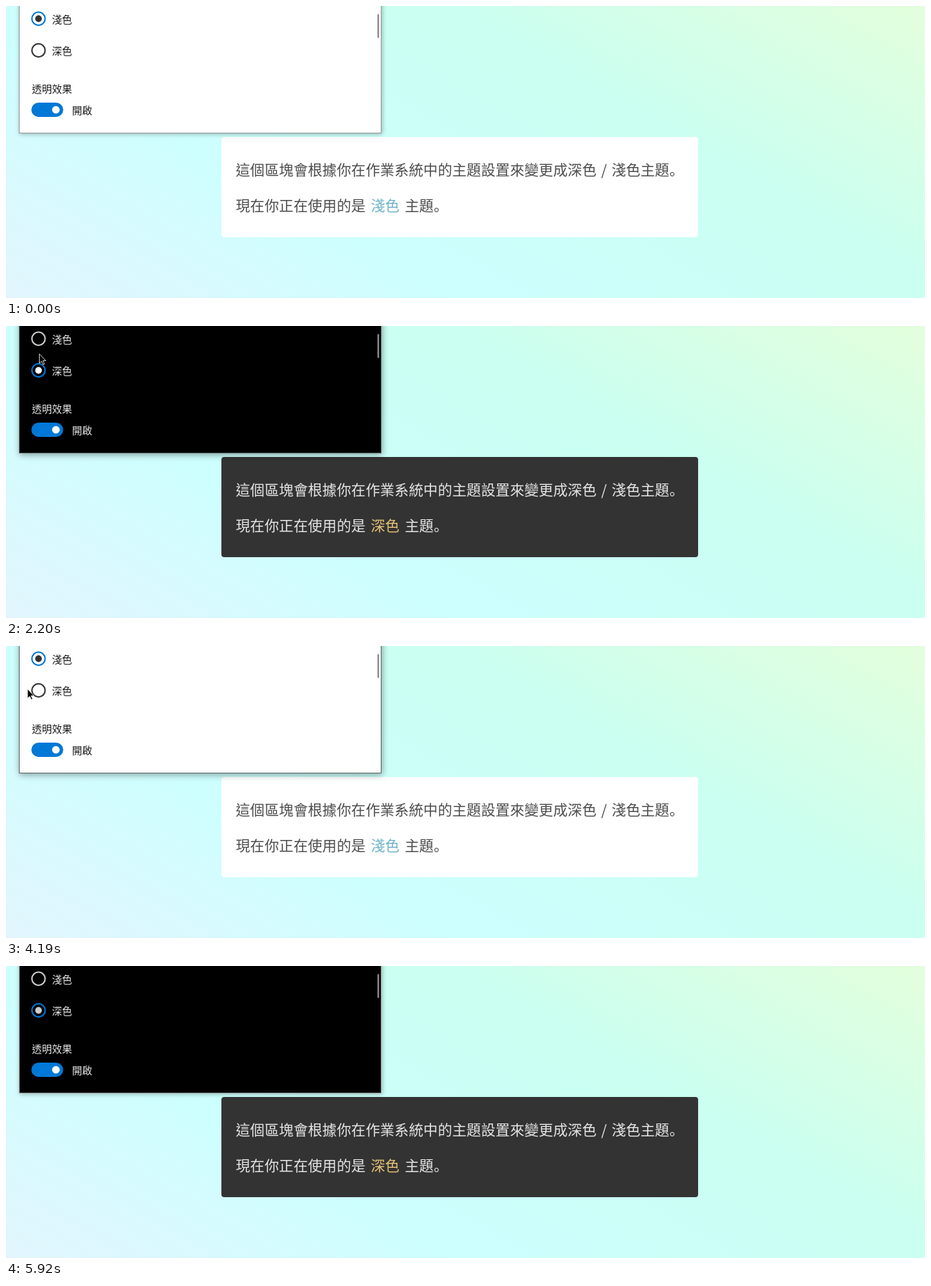
These frames come from a looping animation (1280x408 px, 6020 ms). An HTML page:

```html
<!DOCTYPE html>
<html lang="zh-Hant">
<head>
<meta charset="utf-8">
<style>
  html, body { margin: 0; width: 100%; height: 100%; overflow: hidden; }
  body { background: linear-gradient(30deg, #e2f5fd, #ccfffe 33%, #cafff1 66%, #e3ffdc); }
  svg { position: absolute; left: 0; top: 0; }
  text { font-family: "Noto Sans CJK TC", "Noto Sans CJK", sans-serif; }

  #card { --ink: #333; --accent: #5aa7c0; fill: #fff; }
  #card.dark { --ink: #fff; --accent: #ffd780; fill: #333; }
  #card text { fill: var(--ink); fill-opacity: .88; font-size: 20px; font-weight: 300; letter-spacing: .1px; }
  #card #theme { fill: var(--accent); }
  /* sets the full stop low and left */
  .stop { font-family: "Noto Sans CJK JP", sans-serif; }

  #ui { --face: #fff; --ink: #000; --ring: #333; --hover: #000; --press: #707070; --bar: #7a7a7a; }
  #ui.dark { --face: #000; --ink: #fff; --ring: #ccc; --hover: #fff; --press: #909090; --bar: #a0a0a0; }
  #ui text { fill: var(--ink); fill-opacity: .9; font-size: 14px; }
  #panel { fill: var(--face); stroke: #999; filter: drop-shadow(1px 1px 3px rgba(0,0,0,.3)); }
  .active #panel { stroke: #5d6868; filter: drop-shadow(1px 2px 5px rgba(0,0,0,.38)); }

  .ring { fill: none; stroke: var(--ring); stroke-width: 2; }
  .dot { fill: var(--ring); visibility: hidden; }
  .hover .ring { stroke: var(--hover); }
  .hover .dot { fill: var(--hover); }
  .press .ring { stroke: var(--press); }
  .on .ring { stroke: #0078d7; }
  .on .dot { visibility: visible; }
</style>
</head>
<body>
<svg width="1280" height="408" viewBox="0 0 1280 408">
  <g id="card">
    <rect x="300" y="183" width="664" height="140" rx="4"/>
    <text x="320" y="237">這個區塊會根據你在作業系統中的主題設置來變更成深色</text>
    <text x="829" y="237">/</text>
    <text x="843.5" y="237">淺色主題<tspan class="stop" lang="ja">。</tspan></text>
    <text x="320" y="287">現在你正在使用的是</text>
    <text x="508" y="287" id="theme"></text>
    <text x="555.5" y="287">主題<tspan class="stop" lang="ja">。</tspan></text>
  </g>
  <g id="ui">
    <rect id="panel" x="18.5" y="-19.5" width="504" height="197"/>
    <g id="light" transform="translate(45.3 17.7)">
      <circle class="ring" r="9.2"/>
      <circle class="dot" r="4.7"/>
    </g>
    <g id="deep" transform="translate(45.3 62)">
      <circle class="ring" r="9.2"/>
      <circle class="dot" r="4.7"/>
    </g>
    <text x="64" y="23.5">淺色</text>
    <text x="64" y="67.5">深色</text>
    <text x="36" y="120.5">透明效果</text>
    <text x="92" y="150.5">開啟</text>
    <rect x="35.3" y="135" width="44.4" height="20" rx="10" fill="#0078d7"/>
    <circle cx="69.5" cy="145" r="5.3" fill="#fff"/>
    <rect x="517.5" y="11.5" width="2" height="33" fill="var(--bar)"/>
  </g>
  <path id="cursor" d="M0 0V13.2L3 10.4L5.3 15L7.2 14.1L5 9.7H9Z"
    fill="#000" stroke="#fff" stroke-width=".8"/>
</svg>
<script>
const LOOP = 6020;
const $ = id => document.getElementById(id);

// Pointer moves; it rests in between
const moves = [
  { at: 130, ms: 500, x: 0, y: 55 },        // in from the lower right
  { at: 630, ms: 100, x: 29, y: 58 },
  { at: 830, ms: 200, x: 48.8, y: 62.3 },   // onto the dark option
  { at: 2100, ms: 230, x: 43, y: 5 },
  { at: 2480, ms: 380, x: 47.6, y: 15.8 },  // onto the light option
  { at: 3570, ms: 590, x: 30, y: 60 },
  { at: 4260, ms: 140, x: 41.8, y: 64.6 },  // back to the dark option
  { at: 4630, ms: 390, x: 260, y: 410 }     // out at the bottom
];

function pointer(t) {
  let x = 1168, y = 394;
  for (const m of moves) {
    const k = Math.min(1, Math.max(0, (t - m.at) / m.ms));
    const ease = k * k * (3 - 2 * k);
    x += (m.x - x) * ease;
    y += (m.y - y) * ease;
  }
  return [x, y];
}

function draw() {
  const t = performance.now() % LOOP;
  const within = (a, b) => t >= a && t < b;
  const set = (id, name, on) => $(id).classList.toggle(name, on);

  const dark = within(2100, 3570) || t >= 4630;
  const cardDark = within(1400, 2980) || t >= 4400;
  set("ui", "active", within(1290, 5920));
  set("ui", "dark", dark);
  set("card", "dark", cardDark);
  $("theme").textContent = cardDark ? "深色" : "淺色";

  set("light", "on", !dark);
  set("light", "hover", within(2480, 4190));
  set("light", "press", within(2860, 3570));
  set("deep", "on", dark);
  set("deep", "hover", within(930, 2480) || within(4260, 5720));
  set("deep", "press", within(1290, 2100) || within(4400, 4630));

  $("cursor").style.visibility = within(130, 5020) ? "visible" : "hidden";
  $("cursor").setAttribute("transform", `translate(${pointer(t)})`);
  requestAnimationFrame(draw);
}
draw();
</script>
</body>
</html>
```
